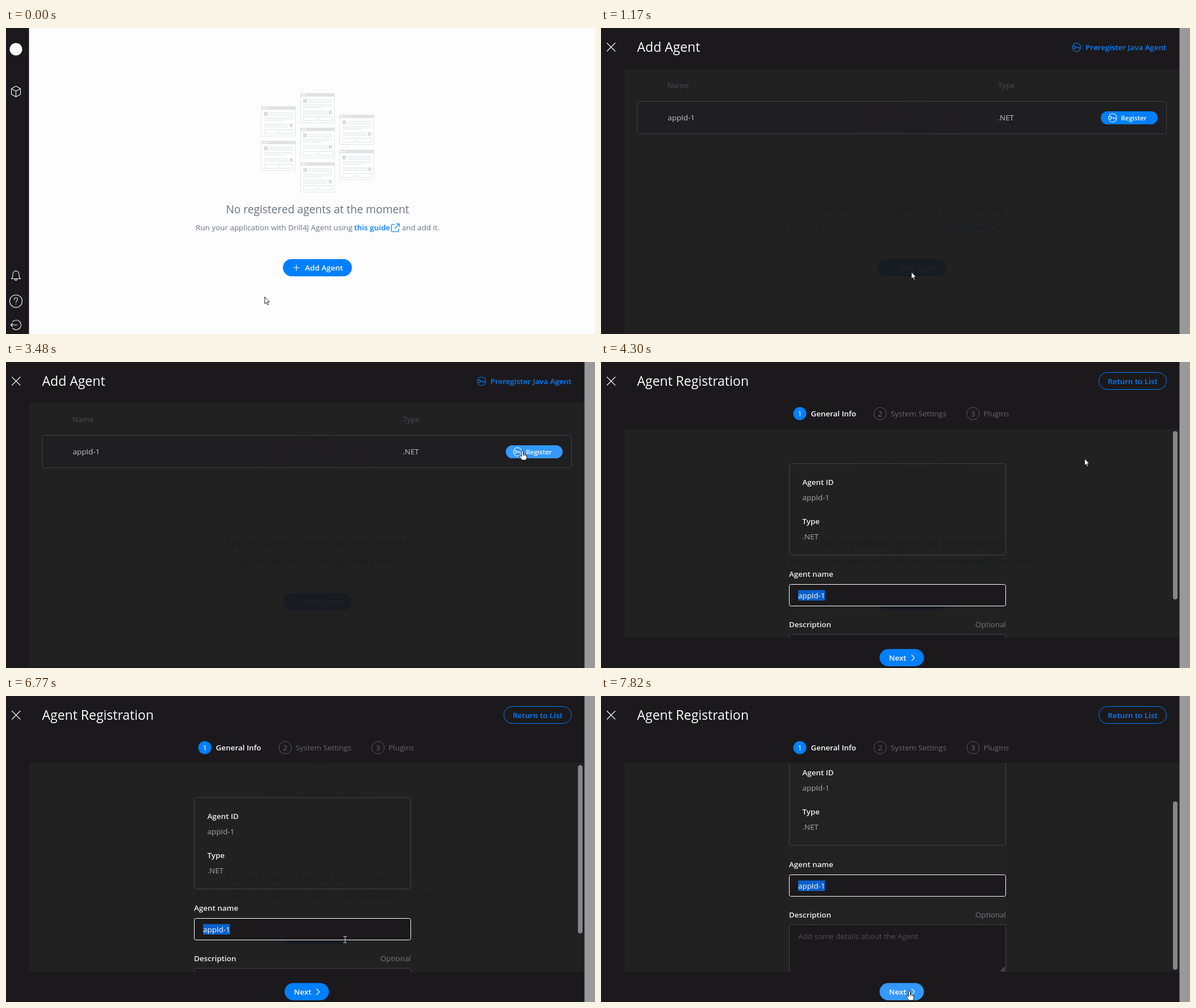
Recreate the animation shown at these times as an HTML page. Size 1037 by 540 pixels, loop 8000 ms.

```html
<!DOCTYPE html>
<html lang="en">
<head>
<meta charset="utf-8">
<title>Agent registration</title>
<style>
html, body { margin: 0; width: 100%; height: 100%; overflow: hidden; background: #fdfdfd; }
svg { display: block; width: 1037px; height: 540px; font: 13.4px "Open Sans", sans-serif; }
.semi { font-weight: 600; }
.h1 { font-size: 23px; fill: #fff; }
.line { fill: none; stroke: currentColor; stroke-width: 1.1; stroke-linecap: round; stroke-linejoin: round; }
.white { fill: #fff; }
.grey { fill: #a4a6aa; }
.dim { fill: #66676b; }
</style>
</head>
<body>
<svg viewBox="0 0 1037 540">
  <defs>
    <g id="sheet">
      <path d="M.5 .5h60v52h-60z" fill="#fff" stroke="#e3e5e8"/>
      <path d="M0 0h61v6H0z" fill="#e0e2e5"/>
      <path d="M2 2h2v2H2zM5 2h2v2H5zM8 2h2v2H8z" fill="#fff"/>
      <path d="M5 10h7v7H5zM50 31h6v6h-6z" fill="#dcdee1"/>
      <path d="M14 11.5h42m-42 2.5h42m-42 2.5h42M5 20.5h51M5 23h51M5 25.5h34M5 31.5h43M5 34h43M5 36.5h43" stroke="#e3e5e8"/>
      <path d="M5.5 41.5h24v7h-24zM32.5 41.5h24v7h-24z" fill="#fff" stroke="#e0e2e5"/>
    </g>
    <g id="key" class="line">
      <path d="M-6 -4.5A7.5 7.5 0 1 1 -6 4.5"/>
      <circle cx="-4.5" r="2.6"/>
      <path d="M-2 0H5V2.6M2 0V2"/>
    </g>
    <path id="cross" class="line" d="M10.5 26.5l14.5 14.5m0 -14.5l-14.5 14.5"/>
    <clipPath id="view"><path d="M40 118h978v369H40z"/></clipPath>
  </defs>

  <g id="home">
    <path d="M0 0h1037v540H0z" fill="#fdfdfd"/>
    <path d="M0 0h40.5v540H0z" fill="#1b191b"/>
    <g id="sheets"></g>
    <g fill="#687481">
      <text x="548.5" y="327" text-anchor="middle" font-size="19.1">No registered agents at the moment</text>
      <text x="334" y="357">Run your application with Drill4J Agent using</text>
      <text x="613" y="357" class="semi" fill="#007fff">this guide</text>
      <text x="697" y="357">and add it.</text>
    </g>
    <path class="line" color="#007fff" d="M684 346.5h-3.5q-2 0 -2 2v9q0 2 2 2h9q2 0 2 -2V354M687 345.5h5.5v5.5M692.5 345.5l-8 8"/>
    <rect id="add" x="487.5" y="407.7" width="121.5" height="30.5" rx="15.25"/>
    <path class="line" color="#fff" d="M506 423h10.5m-5.25 -5.25v10.5"/>
    <text x="526.5" y="428" class="semi white">Add Agent</text>
    <g class="line" color="#fff">
      <circle cx="17.5" cy="37.5" r="11" fill="#fff" stroke="none"/>
      <path d="M17.5 102.5l8 4.5v10l-8 4.5l-8 -4.5v-10zM9.5 107l8 4.5l8 -4.5M17.5 111.5v10"/>
      <path d="M9.5 442.5q2.5 -2 2.5 -7q0 -6.5 5.5 -6.5t5.5 6.5q0 5 2.5 7zM17.5 429v-1.5M15.5 443q0 2.5 2 2.5t2 -2.5"/>
      <circle cx="17.5" cy="482" r="11"/>
      <path d="M14.5 479.5q0 -3.5 3 -3.5t3 3q0 1.5 -1.7 2.6q-1.3 .9 -1.3 2.7M17.5 487v.4"/>
      <path d="M12 518a8.5 8.5 0 1 1 0 12M20 524H8.5m3 -3l-3 3l3 3"/>
    </g>
  </g>

  <g id="list">
    <path d="M0 0h1037v540H0z" fill="#191719" fill-opacity=".957"/>
    <path d="M0 0h1037v72H40.5V540H0zM40 538h980v2H40z" fill="#1b191b"/>
    <use href="#cross" color="#fff"/>
    <text x="63.5" y="42" class="h1">Add Agent</text>
    <use href="#key" x="837" y="34" color="#007fff"/>
    <text x="995.5" y="39" class="semi" fill="#007fff" text-anchor="end">Preregister Java Agent</text>
    <g fill="#4b4a4e"><text x="117" y="106">Name</text><text x="699" y="106">Type</text></g>
    <rect x="64" y="129.5" width="931.5" height="57" rx="4" fill="#1d1b1e" fill-opacity=".4" stroke="#414044"/>
    <g fill="#c3c4c7"><text x="117.5" y="163">appId-1</text><text x="698.5" y="163">.NET</text></g>
    <rect id="register" x="880" y="147" width="100" height="23" rx="11.5"/>
    <use href="#key" x="900.5" y="158.5" color="#fff"/>
    <text x="915.5" y="163" class="semi white" font-size="11.5">Register</text>
  </g>

  <g id="form">
    <path d="M0 0h1037v540H0z" fill="#181818" fill-opacity=".957"/>
    <path id="repaint" d="M331 118h382v369H331z" fill="#222"/>
    <g clip-path="url(#view)">
      <g id="scroll">
        <rect x="331.5" y="179.5" width="381" height="161" rx="3" fill="none" stroke="#434346"/>
        <g class="semi" fill="#eeeeef">
          <text x="354.5" y="217">Agent ID</text>
          <text x="354.5" y="286">Type</text>
          <text x="331" y="378.5">Agent name</text>
          <text x="331" y="468">Description</text>
        </g>
        <g class="grey"><text x="354.5" y="244">appId-1</text><text x="354.5" y="313">.NET</text></g>
        <rect x="331.5" y="392.5" width="381" height="38" rx="3" fill="#1b191b" stroke="#fff"/>
        <path d="M347 402.5h47.5v18.5H347z" fill="#0b60ca"/>
        <text x="347" y="417" class="white">appId-1</text>
        <text x="713" y="468" fill="#77787c" text-anchor="end">Optional</text>
        <rect id="area" x="331.5" y="480.5" width="381" height="84" rx="3" fill="#1b191b"/>
        <text x="347" y="505.5" fill="#4f4e53">Add some details about the Agent</text>
        <path d="M704 563l7 -7m-3 7l3 -3" stroke="#ccc"/>
      </g>
      <rect id="thumb" x="1007" width="8" height="297" rx="4" fill="#83878a"/>
    </g>
    <path d="M0 0h1037v118H40.5V487H1037V540H0z" fill="#1b191b"/>
    <use href="#cross" color="#fff"/>
    <text x="63.5" y="42" class="h1">Agent Registration</text>
    <rect x="876.5" y="18.5" width="119" height="30" rx="15" fill="none" stroke="#007fff"/>
    <text x="936" y="39" class="semi" fill="#007fff" text-anchor="middle">Return to List</text>
    <circle cx="350" cy="91" r="11.5" fill="#007fff"/>
    <g fill="none" stroke="#59595d"><circle cx="491.5" cy="91" r="11"/><circle cx="655" cy="91" r="11"/></g>
    <g class="dim" text-anchor="middle">
      <text x="350" y="96" class="white">1</text>
      <text x="491.5" y="96">2</text>
      <text x="655" y="96">3</text>
    </g>
    <text x="369.5" y="96" class="semi white">General Info</text>
    <text x="510" y="96" class="dim">System Settings</text>
    <text x="673.5" y="96" class="dim">Plugins</text>
    <rect id="next" x="490.5" y="506.5" width="78" height="30.5" rx="15.25"/>
    <text x="507" y="527" class="semi white">Next</text>
    <path class="line" color="#fff" d="M547 517l5 5l-5 5"/>
  </g>

  <path id="edge" d="M1018.5 0h18.5v540h-18.5z" fill="#999"/>

  <g id="cursor">
    <path id="arrow" d="M.5 .5V12.5l2.7 -2.3l2 4.3l1.8 -.8l-1.9 -4.2h3.7z" fill="#fff" stroke="#111" stroke-width=".9"/>
    <g id="hand" fill="#fff" stroke="#16161c">
      <path d="M-1.5 1.7Q-1.5 .3 0 .3T1.5 1.7V7Q3 6 4.2 7.5Q5.8 6.9 6.5 8.3Q8 8 8 10V13Q7.5 15 6.5 17H-1Q-2 15 -4.5 11.7Q-6 9.2 -4.5 9T-1.5 11Z"/>
      <path d="M1.5 7v3M4.2 7.5V10M6.5 8.5v2" fill="none" stroke-width=".8"/>
    </g>
    <path id="beam" d="M-3 -5.5H-.8L0 -5L.8 -5.5H3M0 -5V5M-3 5.5H-.8L0 5L.8 5.5H3" fill="none" stroke="#d5d5d5"/>
  </g>
</svg>
<script>
const LOOP = 8000, STEP = 135, SCROLL_MAX = 77, THUMB_TRAVEL = 64;
const BLUE = { rest: "#007fff", hover: "#3399ff", press: "#006bd8" };

const $ = id => document.getElementById(id);
const show = (id, on) => $(id).setAttribute("display", on ? "inline" : "none");
const progress = (t, start, end) => Math.min(1, Math.max(0, (t - start) / (end - start)));
const smooth = f => f * f * (3 - 2 * f);
const easeOut = f => 1 - (1 - f) ** 2;

// Three columns of sheets, each centred on its own line
$("sheets").innerHTML = [2, 3, 2].map((count, col) => {
  const top = 201 + 7.75 * (col - 0.25) - count * 30.65;
  return Array.from({ length: count }, (_, row) =>
    `<use href="#sheet" x="${449 + col * 69}" y="${Math.round(top + row * 61.3)}"/>`).join("");
}).join("");

// Each move bends through `via` on its way to `to`
const home = [455, 474];
const moves = [
  { start: 130, end: 490, via: [510, 460], to: [546, 430] },
  { start: 1570, end: 2200, via: [488, 230], to: [356, 201] },
  { start: 2650, end: 3480, via: [650, 247], to: [909, 156] },
  { start: 4060, end: 4930, via: [730, 195], to: [668, 238] },
  { start: 5380, end: 6230, via: [525, 330], to: [568, 421] },
  { start: 6230, end: 6720, via: [582, 422], to: [597, 430] },
  { start: 7430, end: 7800, via: [570, 470], to: [543, 520] }
];
const buttons = {
  add: { over: 490, press: 1020, leave: 1170 },
  register: { over: 3480, press: 3910, leave: 4030 },
  next: { over: 7820, press: LOOP, leave: LOOP }
};

function pointerAt(t) {
  return moves.reduce((from, { start, end, via, to }) => {
    const s = smooth(progress(t, start, end));
    return from.map((p, i) => (1 - s) ** 2 * p + 2 * s * (1 - s) * via[i] + s * s * to[i]);
  }, home);
}

function draw(t) {
  const sampled = Math.floor((t + 70) / STEP) * STEP - 30;
  const [x, y] = pointerAt(sampled);
  const offset = SCROLL_MAX * easeOut(progress(sampled, 6800, 7310));
  const page = t < 1170 ? "home" : t < 4030 ? "list" : "form";

  show("list", page === "list");
  show("form", page === "form");
  show("edge", page !== "home");
  show("repaint", offset > 0);
  $("scroll").setAttribute("transform", `translate(0 ${-offset})`);
  $("thumb").setAttribute("y", 122 + offset / SCROLL_MAX * THUMB_TRAVEL);

  let onButton = false;
  for (const [id, { over, press, leave }] of Object.entries(buttons)) {
    const active = t >= over && t < leave;
    $(id).setAttribute("fill", BLUE[!active ? "rest" : t < press ? "hover" : "press"]);
    onButton ||= active;
  }

  const within = (top, bottom) => page === "form" && y > top - offset && y < Math.min(487, bottom - offset);
  const inArea = within(481, 564);
  $("area").setAttribute("stroke", inArea ? "#77777b" : "#434346");

  const kind = onButton ? "hand" : inArea || within(392, 431) ? "beam" : "arrow";
  for (const id of ["arrow", "hand", "beam"]) show(id, id === kind);
  $("cursor").setAttribute("transform", `translate(${Math.round(x)} ${Math.round(y)})`);
}

const start = performance.now();
function tick() {
  draw((performance.now() - start) % LOOP);
  requestAnimationFrame(tick);
}
tick();
</script>
</body>
</html>
```
